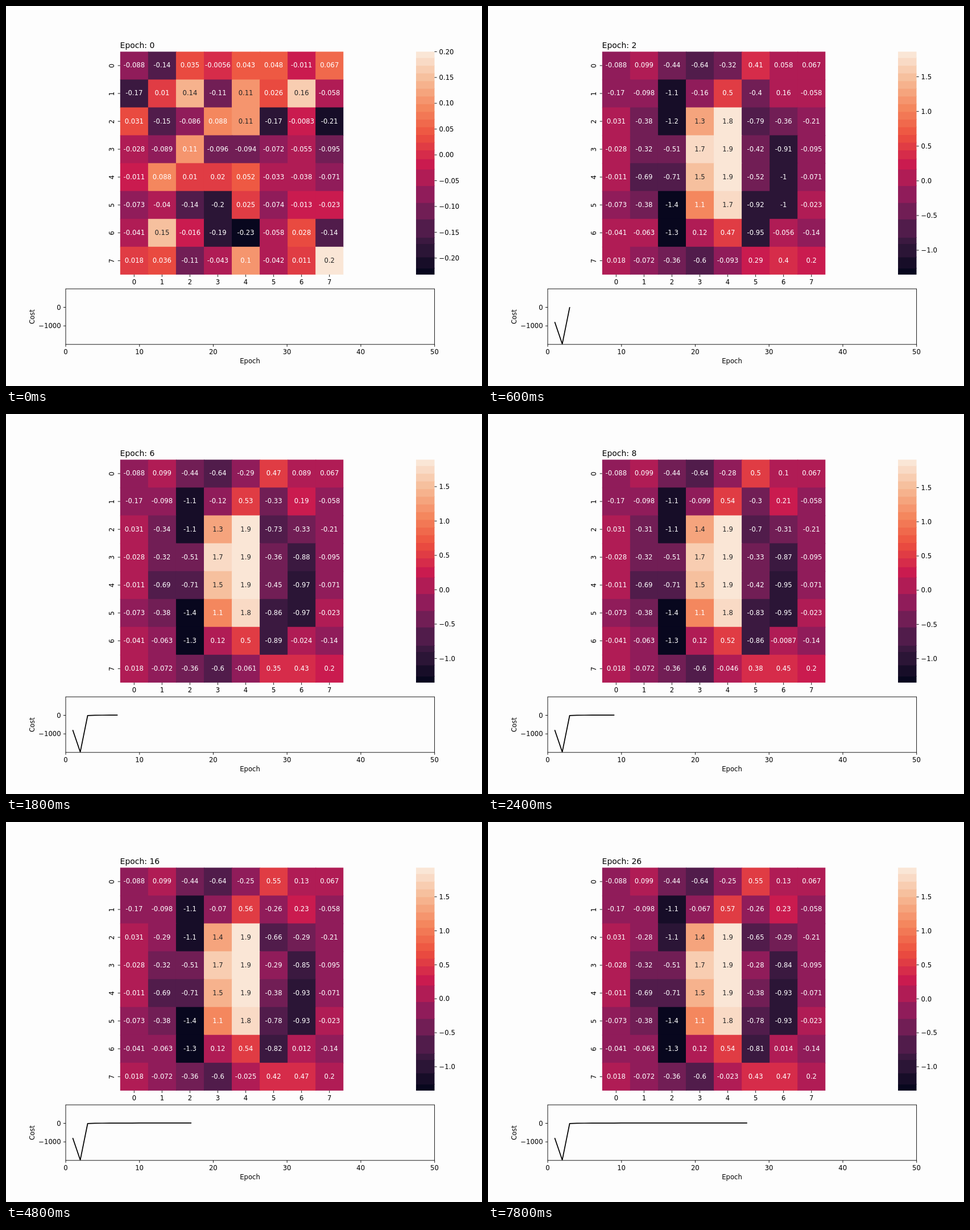
These frames come from a looping animation (837x669 px, 8000 ms). An HTML page:

```html
<!DOCTYPE html>
<html lang="en">
<head>
<meta charset="utf-8">
<title>Training heatmap</title>
<style>
html, body { margin: 0; height: 100%; overflow: hidden; background: #fdfdfd; }
svg { display: block; }
text { font: 11.62px "DejaVu Sans", sans-serif; fill: #000; }
.mid { text-anchor: middle; }
.end { text-anchor: end; }
.title { font-size: 13.95px; }
.axis { stroke: #000; stroke-width: .9; fill: none; }
.curve { stroke: #000; stroke-width: 1.74; fill: none; stroke-linejoin: round; stroke-linecap: square; }
</style>
</head>
<body>
<svg id="stage" width="837" height="669" viewBox="0 0 837 669">
  <clipPath id="plot"><rect x="104.6" y="497.4" width="648.7" height="98.3"/></clipPath>
</svg>
<script>
const stage = document.getElementById('stage');
const LOOP = 8000, STEP = 300, N = 8;
const LEFT = 200.8, TOP = 80.4, CELL = 49.06, BOTTOM = TOP + N * CELL;

// Weights the training converges to
const trained = [
  [-.088, .099, -.44, -.64, -.2525, .55, .1276, .067],
  [-.17, -.098, -1.14, -.0672, .567, -.258, .23, -.058],
  [.031, -.282, -1.086, 1.385, 1.895, -.651, -.288, -.21],
  [-.028, -.3245, -.5145, 1.7, 1.931, -.281, -.843, -.095],
  [-.011, -.69, -.71, 1.5, 1.925, -.378, -.927, -.071],
  [-.073, -.38, -1.351, 1.1, 1.79, -.78, -.932, -.023],
  [-.041, -.063, -1.34, .12, .542, -.814, .014, -.14],
  [.018, -.072, -.36, -.6, -.023, .428, .473, .2]];
const progress = [[2, -.29], [10, .87], [12, .94], [26, 1]];
const cost = [[1, -830], [2, -1990], [3, -30], [4, -8], [8, -6], [11, 5], [50, 5]];

const ramp = ['03051a', '30173a', '611f53', '961c5b', 'cb1b4f', 'ed503e', 'f4875e', 'f6bb97', 'faebdd']
  .map((hex, i) => [i / 8, hex]);
const edges = [0, .03, .08, .14, .168, .25, .324, .4, .474, .52, .56];
for (let i = 1; i <= 12; i++) edges.push(.56 + i * .0345);
edges.push(1);

function lerpAt(points, x, mix) {
  let i = 1;
  while (i < points.length - 1 && x > points[i][0]) i++;
  const [x0, a] = points[i - 1], [x1, b] = points[i];
  return mix(a, b, (x - x0) / (x1 - x0));
}
const mixNum = (a, b, k) => a + (b - a) * k;
const channel = (hex, i) => parseInt(hex.slice(i * 2, i * 2 + 2), 16);
const mixHex = (a, b, k) =>
  `rgb(${[0, 1, 2].map(i => Math.round(mixNum(channel(a, i), channel(b, i), k)))})`;

const bands = edges.slice(1).map((hi, i) =>
  ({ lo: edges[i], hi, color: lerpAt(ramp, (edges[i] + hi) / 2, mixHex) }));
const shade = u => (bands.find(b => u < b.hi) || bands[bands.length - 1]).color;

// Weight rules: seeded noise, then a ridge, then a slow drift to the trained state
let seed = 7;
const random = () => (seed = (seed * 16807) % 2147483647) / 2147483647;
const noise = Array.from({ length: N * N }, () => random() + random());
const low = Math.min(...noise), high = Math.max(...noise);
const initial = (r, c) => mixNum(-.232, .161, (noise[r * N + c] - low) / (high - low));

function ridge(r, c) {
  const center = 3.4 + .1 * Math.abs(r - 3);
  return (2.2 - .03 * (r - 3) ** 2) * Math.exp(-((c - center) ** 2) / 2.2);
}
function drift(r, c) {
  if (c === 5) return .108;
  if ((r === 2 && c < 4) || (r === 1 && c === 3)) return .075;
  return c > 3 ? .054 : 0;
}
function weight(epoch, r, c) {
  const end = trained[r][c];
  if (c % 7 === 0) return end;
  if (epoch === 0) return initial(r, c);
  if (epoch === 1) return ridge(r, c);
  return end + drift(r, c) * (lerpAt(progress, epoch, mixNum) - 1);
}

function add(tag, attrs, parent = stage) {
  const el = document.createElementNS('http://www.w3.org/2000/svg', tag);
  for (const k in attrs) el.setAttribute(k, attrs[k]);
  return parent.appendChild(el);
}
function label(str, x, y, cls = '', parent = stage) {
  const el = add('text', { x, y, class: cls }, parent);
  el.textContent = str;
  return el;
}
const upright = (str, x, y) =>
  label(str, 0, 0, 'mid').setAttribute('transform', `translate(${x} ${y}) rotate(-90)`);
const tick = (d, parent) => add('path', { d, class: 'axis' }, parent);
const minus = s => s.replace('-', '\u2212');

const title = label('', LEFT - .2, 73.5, 'title');

// Heatmap cells overlap to the right and down so that no seams show
const cells = [];
for (let r = 0; r < N; r++) for (let c = 0; c < N; c++) {
  const rect = add('rect', {
    x: LEFT + c * CELL, y: TOP + r * CELL,
    width: CELL + (c < N - 1), height: CELL + (r < N - 1)
  });
  cells.push({ rect, r, c });
}
for (const cell of cells)
  cell.text = label('', LEFT + (cell.c + .5) * CELL, TOP + (cell.r + .5) * CELL + 3.5, 'mid');
for (let i = 0; i < N; i++) {
  const x = LEFT + (i + .5) * CELL, y = TOP + (i + .5) * CELL;
  tick(`M${x} ${BOTTOM}v4.1`);
  label(i, x, 490, 'mid');
  tick(`M${LEFT} ${y}h-4.1`);
  upright(i, 190.2, y + .5);
}

// Colour bar
const barY = u => BOTTOM - u * (BOTTOM - TOP);
for (const { lo, hi, color } of bands) {
  const y = barY(hi);
  add('rect', { x: 721, y, width: 32.5, height: barY(lo) - y + (lo > 0), fill: color });
}
const barTicks = add('g', {});

// Cost plot
const px = e => 104.63 + e * 12.973, py = v => 530 - v * .0327;
const curve = add('path', { class: 'curve', 'clip-path': 'url(#plot)' });
add('rect', { x: 105, y: 498, width: 648.6, height: 97.8, class: 'axis' });
for (let e = 0; e <= 50; e += 10) {
  tick(`M${px(e) + .4} 595.8v4.1`);
  label(e, px(e) + .2, 613.2, 'mid');
}
for (const v of [0, -1000]) {
  tick(`M105 ${py(v) + .5}h-4.1`);
  label(minus(String(v)), 96.6, py(v) + 4.7, 'end');
}
label('Epoch', 429, 628.8, 'mid');
upright('Cost', 50.4, 547.2);

function render(epoch) {
  const values = cells.map(({ r, c }) => weight(epoch, r, c));
  const min = Math.min(...values), max = Math.max(...values);
  const norm = v => (v - min) / (max - min);

  title.textContent = 'Epoch: ' + epoch;
  cells.forEach(({ rect, text }, i) => {
    const u = norm(values[i]);
    rect.setAttribute('fill', shade(u));
    text.textContent = String(+values[i].toPrecision(2));
    text.style.fill = u > .79 ? '#262626' : '#fff';
  });

  barTicks.replaceChildren();
  const [gap, digits] = max - min < 1 ? [.05, 2] : [.5, 1];
  for (let i = Math.ceil(min / gap); i * gap <= max; i++) {
    const y = barY(norm(i * gap));
    tick(`M753.5 ${y}h4.1`, barTicks);
    label(minus((i * gap).toFixed(digits)), 761.6, y + 4.2, '', barTicks);
  }

  let d = '';
  for (let e = 1; epoch && e <= epoch + 1; e++)
    d += `${d ? 'L' : 'M'}${px(e)} ${py(lerpAt(cost, e, mixNum))}`;
  curve.setAttribute('d', d);
}

let shown = -1;
function frame() {
  const epoch = Math.floor(performance.now() % LOOP / STEP);
  if (epoch !== shown) render(shown = epoch);
  requestAnimationFrame(frame);
}
frame();
</script>
</body>
</html>
```
